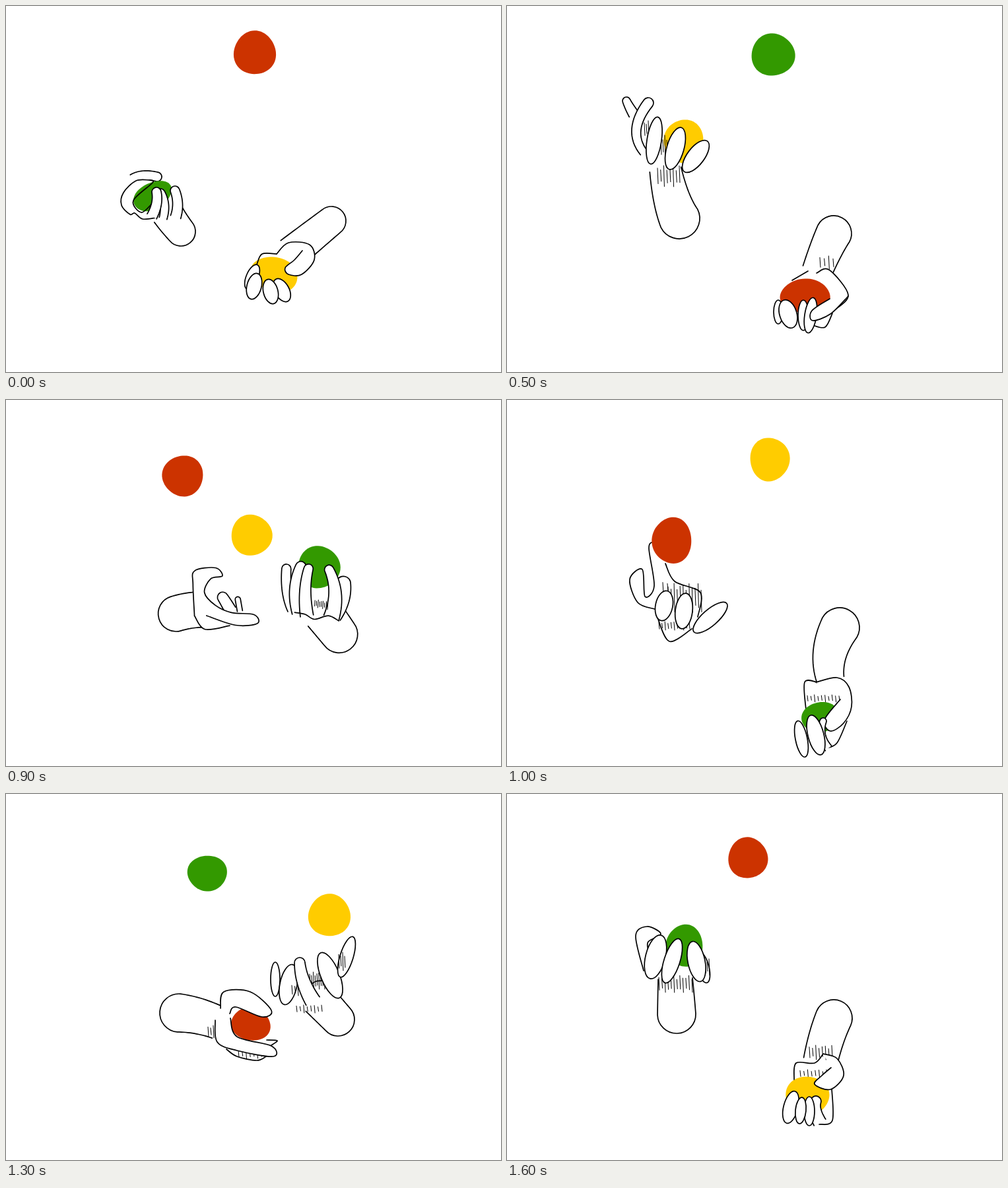
An HTML page with a canvas for the animation above (1700 ms loop, 750x555 px).

```html
<!DOCTYPE html>
<html lang="en">
<head>
<meta charset="utf-8">
<title>Juggling hands</title>
<style>
html, body { margin: 0; width: 100%; height: 100%; overflow: hidden; background: #fff; }
canvas { display: block; }
</style>
</head>
<body>
<canvas id="stage" width="750" height="555"></canvas>
<script>
const ctx = document.getElementById('stage').getContext('2d');
const RED = '#cc3300', GREEN = '#339900', YELLOW = '#ffcc00';
const STEP = 100;

function ink(filled) {
  ctx.fillStyle = '#fff';
  if (filled) ctx.fill();
  ctx.lineWidth = 1.7;
  ctx.stroke();
}

// Smooth line through x, y pairs.
function trace(coords) {
  const last = coords.length / 2 - 1;
  const at = i => { const k = 2 * Math.max(0, Math.min(last, i)); return [coords[k], coords[k + 1]]; };
  ctx.beginPath();
  ctx.moveTo(...at(0));
  for (let i = 0; i < last; i++) {
    const [a, b, c, d] = [at(i - 1), at(i), at(i + 1), at(i + 2)];
    ctx.bezierCurveTo(b[0] + (c[0] - a[0]) / 6, b[1] + (c[1] - a[1]) / 6,
      c[0] - (d[0] - b[0]) / 6, c[1] - (d[1] - b[1]) / 6, ...c);
  }
}

function curve(...coords) { trace(coords); ink(false); }
function shape(...coords) { trace(coords); ink(true); }

function oval(x, y, rx, ry, turn = 0) {
  ctx.beginPath();
  ctx.ellipse(x, y, rx, ry, turn, 0, 2 * Math.PI);
  ink(true);
}

// Tapered tube bent through (mx, my): open at the base, round at the tip.
function limb(x0, y0, mx, my, x1, y1, r0, r1) {
  const cx = 2 * mx - (x0 + x1) / 2, cy = 2 * my - (y0 + y1) / 2;
  const edge = (t, side) => {
    const s = 1 - t, r = r0 + (r1 - r0) * t;
    const a = Math.atan2(s * (cy - y0) + t * (y1 - cy), s * (cx - x0) + t * (x1 - cx)) + side * Math.PI / 2;
    ctx.lineTo(s * s * x0 + 2 * s * t * cx + t * t * x1 + r * Math.cos(a),
      s * s * y0 + 2 * s * t * cy + t * t * y1 + r * Math.sin(a));
  };
  const end = Math.atan2(y1 - cy, x1 - cx);
  ctx.beginPath();
  for (let t = 0; t <= 1; t += 1 / 16) edge(t, -1);
  ctx.arc(x1, y1, r1, end - Math.PI / 2, end + Math.PI / 2);
  for (let t = 1; t >= 0; t -= 1 / 16) edge(t, 1);
  ink(true);
}

function ball(color, x, y, rx = 31, ry = rx, turn = 0) {
  if (!color) return;
  ctx.beginPath();
  for (let a = 0; a < 2 * Math.PI; a += 0.1) {
    const k = 1 + 0.025 * Math.sin(3 * a + x);
    const u = k * rx * Math.cos(a), v = k * ry * Math.sin(a);
    ctx.lineTo(x + u * Math.cos(turn) - v * Math.sin(turn), y + u * Math.sin(turn) + v * Math.cos(turn));
  }
  ctx.fillStyle = color;
  ctx.fill();
}

function hatch(x, y, w, h, count) {
  ctx.lineWidth = 1;
  ctx.beginPath();
  for (let i = 0; i < count; i++) {
    const px = x + w * i / (count - 1);
    ctx.moveTo(px, y + h * 0.12 * (1 + Math.sin(i * 2.4)));
    ctx.lineTo(px + 1, y + h * (0.86 + 0.14 * Math.sin(i * 4.1)));
  }
  ctx.stroke();
}

// Left hand poses
function leftCock(color) {
  limb(245, 315, 254, 328, 265, 342, 24, 22);
  limb(192, 262, 208, 257, 229, 259, 7, 7);
  shape(218, 264, 197, 265, 178, 283, 175, 302, 188, 316, 195, 314, 207, 323, 228, 321);
  ball(color, 222, 288, 31, 20, -0.5);
  curve(218, 264, 222, 268, 193, 295, 205, 313, 221, 300);
  limb(238, 322, 240, 302, 234, 284, 6, 7);
  limb(221, 319, 228, 300, 228, 282, 8, 7);
  limb(257, 320, 260, 300, 256, 280, 8, 7);
}

function leftInside(color) {
  limb(300, 325, 280, 323, 259, 324, 27, 27);
  shape(286, 332, 298, 355, 336, 356);
  ball(color, 334, 304, 25, 24);
  limb(341, 333, 337, 322, 333, 312, 9, 8);
  limb(355, 337, 355, 330, 355, 319, 4, 4);
  shape(286, 332, 292, 285, 298, 265, 330, 266, 338, 280, 320, 281, 307, 300, 320, 322, 342, 337, 375, 346, 378, 360, 345, 357, 304, 335);
}

function leftCatch(color) {
  limb(240, 248, 249, 290, 261, 322, 24, 31);
  hatch(228, 242, 33, 32, 8);
  limb(192, 164, 186, 154, 181, 144, 8, 6);
  limb(207, 222, 196, 187, 214, 147, 6, 8);
  hatch(208, 174, 6, 26, 3);
  ball(color, 268, 205, 30, 33);
  hatch(233, 196, 9, 34, 4);
  oval(223, 204, 11, 36, 0.15);
  oval(255, 216, 13, 33, 0.28);
  oval(286, 228, 13, 29, 0.65);
}

function leftDip(color) {
  limb(268, 372, 264, 350, 260, 331, 20, 28);
  curve(247, 370, 250, 395, 248, 435);
  hatch(264, 339, 22, 18, 6);
  ball(color, 296, 411, 28, 26);
  shape(258, 374, 261, 351, 277, 354, 300, 388, 268, 374);
  shape(256, 449, 278, 467, 305, 460, 320, 435, 300, 437);
  curve(262, 460, 290, 470, 318, 450);
  shape(249, 405, 248, 435, 258, 451, 290, 444, 304, 421, 285, 419, 258, 425);
}

function leftReach() {
  curve(228, 330, 246, 366, 280, 347);
  hatch(236, 274, 7, 22, 2);
  hatch(244, 278, 50, 44, 12);
  hatch(230, 336, 46, 13, 11);
  shape(224, 317, 198, 307, 186, 272, 205, 257, 209, 298, 223, 282, 215, 225, 222, 215);
  curve(240, 248, 254, 275, 293, 292, 289, 329);
  oval(308, 330, 12, 33, 0.85);
  oval(238, 312, 13, 23, 0.2);
  oval(268, 320, 13, 27, 0.12);
}

function leftScoop(color) {
  limb(322, 347, 292, 337, 262, 332, 25, 29);
  hatch(306, 351, 12, 19, 4);
  shape(334, 387, 350, 398, 380, 404, 394, 398);
  hatch(352, 387, 40, 14, 8);
  shape(395, 373, 411, 374, 402, 381);
  ball(color, 371, 349, 30, 25, 0.2);
  shape(325, 325, 330, 300, 370, 300, 402, 328, 388, 338, 348, 323, 339, 333);
  shape(317, 343, 320, 376, 350, 389, 405, 398, 402, 382, 350, 368, 340, 340);
}

function leftCup(color) {
  limb(255, 280, 256, 305, 257, 334, 26, 29);
  hatch(230, 275, 50, 26, 12);
  shape(207, 268, 195, 215, 212, 201, 233, 212, 214, 224, 214, 237);
  oval(297, 263, 9, 24, -0.25);
  hatch(300, 250, 6, 25, 3);
  ball(color, 269, 230, 28, 32);
  oval(225, 247, 15, 34, 0.25);
  oval(250, 253, 12, 35, 0.31);
  oval(287, 254, 13, 31, -0.2);
}

// Right hand poses
function rightToss(color) {
  limb(432, 375, 463, 350, 493, 326, 25, 22);
  ball(color, 407, 407, 36, 26, 0.3);
  curve(380, 392, 388, 376, 410, 376);
  shape(410, 376, 428, 359, 460, 362, 467, 385, 448, 407, 428, 407, 423, 397, 437, 385, 449, 371);
  oval(373, 411, 9, 20, 0.4);
  oval(376, 425, 11, 20, 0.25);
  oval(418, 431, 11, 19, -0.5);
  oval(401, 433, 11, 19, -0.25);
}

function rightCup(color) {
  limb(468, 305, 482, 318, 496, 331, 30, 28);
  limb(491, 309, 495, 280, 489, 254, 3, 11);
  ball(color, 448, 236, 32, 32);
  limb(420, 306, 407, 280, 400, 247, 8, 7);
  limb(428, 310, 418, 275, 421, 240, 8, 8);
  limb(443, 312, 434, 275, 433, 241, 10, 7);
  limb(480, 308, 479, 270, 464, 237, 12, 7);
  hatch(451, 285, 20, 12, 9);
  curve(424, 310, 440, 310, 455, 315, 475, 306, 492, 311);
}

function rightLow(color) {
  limb(470, 402, 483, 370, 495, 345, 23, 27);
  hatch(474, 379, 20, 20, 4);
  curve(432, 416, 456, 402);
  shape(469, 405, 488, 400, 517, 438, 495, 462);
  curve(463, 484, 482, 487, 493, 466);
  ball(color, 452, 440, 38, 26);
  oval(411, 464, 7, 18);
  oval(426, 467, 13, 22, -0.3);
  oval(449, 469, 8, 23);
  oval(460, 469, 9, 27, 0.15);
  shape(489, 444, 462, 462, 463, 477, 490, 467, 517, 440);
}

function rightOpen() {
  limb(424, 308, 460, 317, 494, 325, 26, 33);
  limb(417, 293, 407, 262, 396, 240, 9, 10);
  limb(398, 306, 380, 280, 359, 264, 12, 10);
  limb(392, 332, 350, 325, 325, 312, 7, 8);
  limb(392, 322, 358, 316, 331, 308, 6, 6);
  curve(322, 320, 355, 340, 385, 346, 420, 332);
  hatch(426, 322, 13, 13, 5);
}

function rightDeep(color) {
  limb(490, 424, 489, 385, 504, 345, 21, 30);
  curve(470, 428, 451, 428, 453, 470);
  ball(color, 474, 481, 28, 23, -0.3);
  curve(484, 528, 500, 520, 515, 487);
  shape(468, 428, 500, 421, 518, 435, 522, 465, 510, 490, 490, 502, 481, 485, 505, 454);
  hatch(455, 447, 48, 11, 10);
  oval(446, 514, 9, 28, -0.2);
  limb(487, 528, 477, 508, 479, 487, 6, 5);
  oval(468, 508, 12, 31, -0.25);
}

function rightReach() {
  limb(474, 311, 488, 326, 503, 342, 27, 25);
  hatch(440, 320, 38, 12, 8);
  oval(408, 281, 7, 26);
  oval(428, 289, 13, 31, 0.2);
  hatch(433, 288, 9, 18, 3);
  hatch(460, 270, 22, 26, 9);
  curve(460, 290, 470, 284, 483, 283);
  limb(465, 314, 451, 285, 445, 256, 12, 8);
  oval(491, 275, 14, 37, -0.39);
  oval(516, 247, 10, 32, 0.3);
  hatch(504, 240, 9, 28, 4);
}

function rightFist(color) {
  limb(475, 405, 484, 370, 495, 340, 26, 28);
  hatch(458, 381, 34, 22, 8);
  hatch(444, 418, 40, 12, 8);
  curve(473, 501, 493, 495, 492, 446);
  ball(color, 455, 458, 33, 30);
  curve(435, 433, 438, 408, 466, 408, 479, 394);
  shape(479, 394, 500, 401, 510, 427, 490, 448, 466, 440, 477, 427, 491, 415);
  oval(430, 475, 11, 25, 0.25);
  limb(474, 498, 467, 480, 468, 466, 10, 8);
  oval(458, 481, 8, 22);
  oval(445, 480, 8, 20, 0.1);
}

// A hand swings about its elbow by some degrees.
function hand(elbowX, elbowY, pose, color, turn, dx, dy) {
  ctx.save();
  ctx.translate(elbowX + dx, elbowY + dy);
  ctx.rotate(turn * Math.PI / 180);
  ctx.translate(-elbowX, -elbowY);
  pose(color);
  ctx.restore();
}
const left = (pose, color, turn = 0, dx = 0, dy = 0) => hand(258, 332, pose, color, turn, dx, dy);
const right = (pose, color, turn = 0, dx = 0, dy = 0) => hand(500, 335, pose, color, turn, dx, dy);

const steps = [
  () => { left(leftCock, GREEN); right(rightToss, YELLOW); ball(RED, 377, 71, 32, 33); },
  () => { left(leftDip, GREEN, 8); right(rightOpen, null, -6); ball(RED, 412, 78); ball(YELLOW, 345, 245); },
  () => { left(leftScoop, GREEN, -3); right(rightReach); ball(RED, 448, 165); ball(YELLOW, 328, 135); },
  () => { left(leftInside, GREEN); right(rightCup, RED); ball(YELLOW, 339, 98, 29, 31); },
  () => { left(leftReach, null, 0, 12, 6); right(rightLow, RED, -12); ball(YELLOW, 298, 135); ball(GREEN, 368, 150); },
  () => { left(leftCatch, YELLOW); right(rightLow, RED); ball(GREEN, 403, 74, 33, 32); },
  () => { left(leftCock, YELLOW, -25); right(rightToss, RED, 10); ball(GREEN, 430, 42); },
  () => { left(leftDip, YELLOW); right(rightOpen); ball(GREEN, 455, 125, 33, 31); ball(RED, 331, 203, 22, 50, -0.45); },
  () => { left(leftScoop, YELLOW, -8); right(rightReach, null, 4); ball(RED, 303, 88); ball(GREEN, 485, 195); },
  () => { left(leftInside, null, -10); right(rightCup, GREEN, 10, 8, 25); ball(RED, 268, 115); ball(YELLOW, 372, 205); },
  () => { left(leftReach); right(rightDeep, GREEN); ball(YELLOW, 398, 90, 30, 33); ball(RED, 250, 213, 30, 35); },
  () => { left(leftCock, RED, 8); right(rightToss, GREEN, -8); ball(YELLOW, 438, 42); },
  () => { left(leftDip, RED, 28); right(rightOpen, null, -14); ball(GREEN, 340, 245); ball(YELLOW, 472, 88); },
  () => { left(leftScoop, RED); right(rightReach); ball(GREEN, 305, 120, 30, 27); ball(YELLOW, 490, 184, 32); },
  () => { left(leftInside, RED, 3); right(rightCup, YELLOW, 0, 8, -6); ball(GREEN, 288, 65); },
  () => { left(leftReach, null, 0, 14, 8); right(rightDeep, YELLOW, 0, 10, 12); ball(RED, 360, 170); ball(GREEN, 262, 118); },
  () => { left(leftCup, GREEN); right(rightFist, YELLOW); ball(RED, 365, 97, 30, 31); }
];

function draw() {
  ctx.fillStyle = '#fff';
  ctx.fillRect(0, 0, 750, 555);
  ctx.strokeStyle = '#000';
  ctx.lineCap = ctx.lineJoin = 'round';
  steps[Math.floor(performance.now() / STEP) % steps.length]();
  requestAnimationFrame(draw);
}
draw();
</script>
</body>
</html>
```
